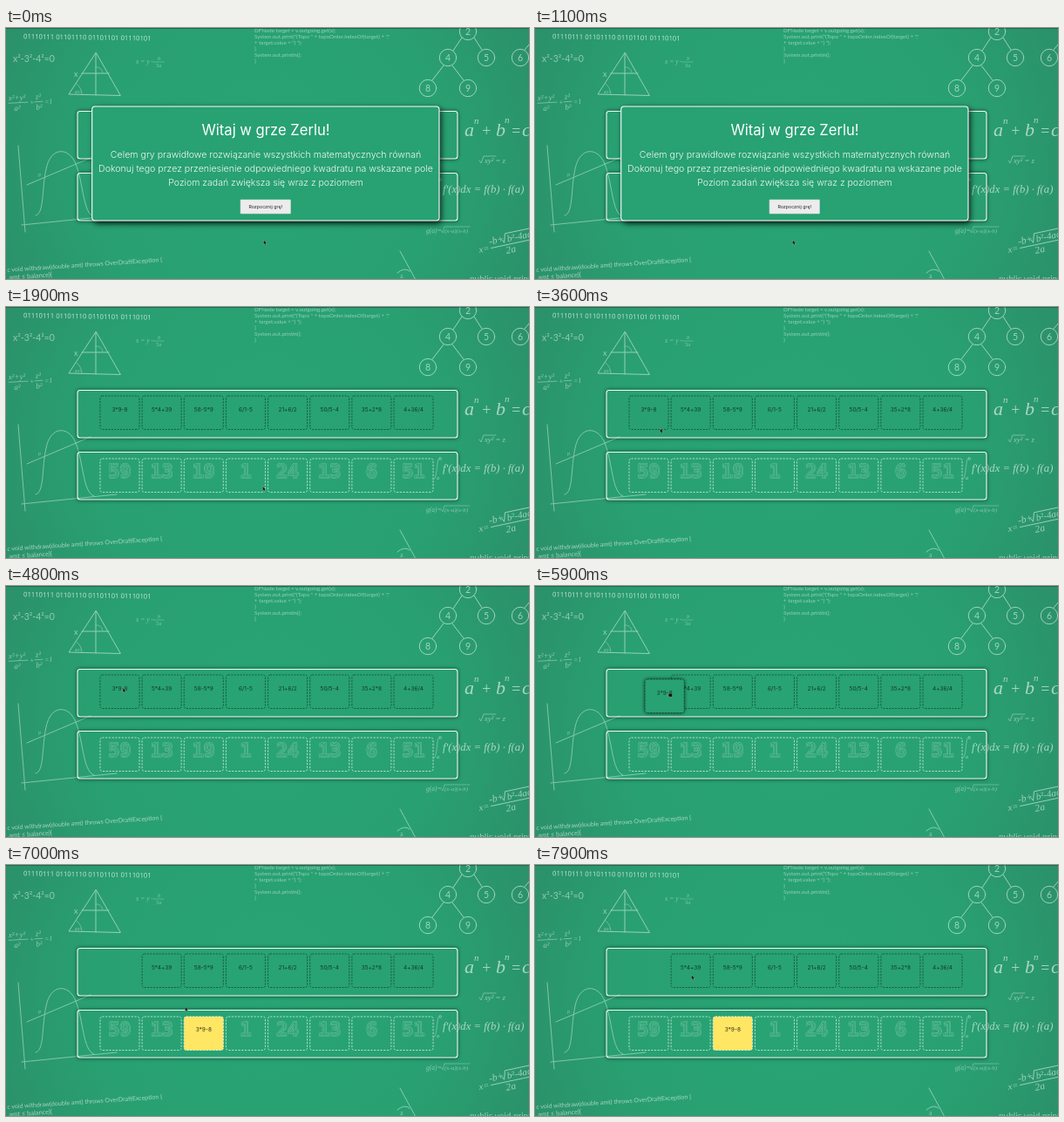
Write an HTML page that moves like this. It is 600 by 288 pixels and loops after 8000 ms.

```html
<!DOCTYPE html>
<html lang="pl">
<head>
<meta charset="utf-8">
<style>
html, body { margin: 0; width: 100%; height: 100%; overflow: hidden; background: #29a072; }
svg { display: block; width: 600px; height: 288px; }
text { white-space: pre; }
.chalk { fill: none; stroke: #fff; stroke-linecap: round; stroke-linejoin: round; }
.chalk text { fill: #fff; stroke: none; font-family: Lato, "Open Sans", sans-serif; }
.chalk .math text { font-family: "Liberation Serif", serif; font-style: italic; }
.ui text { font-family: Inter, "Open Sans", sans-serif; font-feature-settings: "calt" 0; text-anchor: middle; }
.ui .digits { font: bold 21.5px "DejaVu Sans Mono", monospace; fill: none; stroke-linejoin: round; }
</style>
</head>
<body>
<svg id="stage" viewBox="0 0 600 288">
  <defs>
    <radialGradient id="board" gradientUnits="userSpaceOnUse" cx="300" cy="150" r="340">
      <stop offset="0" stop-color="#28a474"/>
      <stop offset=".6" stop-color="#29a072"/>
      <stop offset="1" stop-color="#2b9069"/>
    </radialGradient>
    <filter id="soft" x="-30%" y="-30%" width="160%" height="160%"><feGaussianBlur stdDeviation="2"/></filter>
    <filter id="wide" x="-30%" y="-30%" width="160%" height="160%"><feGaussianBlur stdDeviation="3.5"/></filter>
    <clipPath id="outside">
      <path clip-rule="evenodd" d="M0 0H600V288H0ZM82 95.5H518V150H82ZM82 166.5H518V221H82Z"/>
    </clipPath>
  </defs>
  <rect width="600" height="288" fill="url(#board)"/>
  <rect width="600" height="1" fill="#1d6b4d"/>
  <g id="doodles" class="chalk"></g>
  <g id="panels" class="ui"></g>
  <g id="modal" class="ui"></g>
  <g id="cursor">
    <path id="arrow" d="M-1.5-2.8V2.4L-.3 1.4L.6 3.2L1.6 2.7L.8 1H2.3Z" fill="#111" stroke="#cfe8dc" stroke-width=".3"/>
    <path id="hand" d="M-2.3 0Q-2-1.6-.8-1.5Q-.4-3 .5-2Q1.8-2.4 2-.8Q3 0 2.2 2.2H-1.4Z" fill="#111" stroke="#cfe8dc" stroke-width=".3"/>
  </g>
</svg>
<script>
const LOOP = 8000, CLOSE = 1600, GRAB = 5500, DROP = 6700;
const GREEN = '#28a273';
const $ = id => document.getElementById(id);

const text = (x, y, str, size, attrs = '') =>
  `<text x="${x}" y="${y}" font-size="${size}" ${attrs}>${str}</text>`;
const path = (d, attrs = '') => `<path d="${d}" ${attrs}/>`;
const rect = (x, y, w, h, r, attrs) =>
  `<rect x="${x}" y="${y}" width="${w}" height="${h}" rx="${r}" ${attrs}/>`;
const group = (attrs, ...parts) => `<g ${attrs}>${parts.join('')}</g>`;

function doodles() {
  const nodes = [[530, 4, 2], [507, 34, 4], [551, 34, 5], [590, 34, 6], [484, 69, 8], [530, 69, 9]];
  const code = ['DFNode target = v.outgoing.get(x);',
    'System.out.print("(Topo " + topoOrder.indexOf(target) + ","',
    '+ target.value + ") ");', '}', 'System.out.println();', '}'];
  return [
    group('opacity=".75"', text(20, 12.3, '01110111 01101110 01101101 01110101', 7.7,
      'style="font-family:Open Sans,sans-serif" transform="rotate(.9 20 12)"')),
    group('opacity=".48"', text(8, 38.5, 'x²-3²-4²=0', 10.5)),
    group('opacity=".5" stroke-width="1"',
      path('M103 28.5L72 76L131 77.5ZM103 29V77M87 52H118'),
      path('M81 64Q87 69 87 76M103 45Q109 44 111 51', 'stroke-width=".6"'),
      text(78, 56, 'x', 9), text(79, 75, '45°', 4.5)),
    group('class="math" opacity=".4" stroke-width=".6"', text(149, 41, 'x = y -', 7.5),
      text(174, 37, 'b', 6.5), text(172, 45, '5a', 6.5), path('M169 39H181')),
    group('class="math" opacity=".5" stroke-width=".7" transform="rotate(-3 28 84)"',
      text(3, 82, 'x²+y²', 9), path('M3 85H25'), text(9, 94, 'a²', 9),
      text(27, 88, '+', 8), text(34, 82, 'z²', 9), path('M33 85H42'), text(34, 94, 'b²', 9),
      text(44, 88, '=1', 8)),
    group('opacity=".42" stroke-width="1"',
      path('M14 135L22 234M18 226L127 215'),
      path('M34 215C44 214 41 184 46 162C51 136 72 136 80 156C89 178 88 213 101 217'),
      path('M24 180L97 149'), text(37, 171, 'P', 5.5)),
    group('opacity=".58" transform="rotate(-3.8 0 280)"',
      text(1.5, 280, 'c void withdraw(double amt) throws OverDraftException {', 7.05),
      text(3, 289, 'amt ≤ balance){', 7.5)),
    group('opacity=".5"', ...code.map((line, i) => text(285, 4.5 + i * 7.15, line, 6.15))),
    group('opacity=".55" stroke-width="1"',
      path('M523 11L513 26M537 11L546 25M502 43L489 60M512 43L525 60M595 25L600 19'),
      ...nodes.map(([x, y, n]) => `<circle cx="${x}" cy="${y}" r="9.7"/>` +
        text(x, y + 3.8, n, 10.5, 'text-anchor="middle"'))),
    group('class="math" opacity=".6"', text(526, 124, 'a', 22), text(537, 110, 'n', 11),
      text(545, 124, '+', 18), text(562, 124, 'b', 22), text(572, 109, 'n', 11),
      text(579, 124, '=', 18), text(592, 124, 'c', 22)),
    group('class="math" opacity=".5" stroke-width=".7"', text(549, 155, 'xy² = z', 8.7),
      path('M543 152L545 155L548 147H562')),
    group('class="math" opacity=".6"',
      path('M498 173C493 171 496 198 490 198', 'stroke-width=".8" opacity=".7"'),
      text(497, 176, 'b', 6), text(494, 198, 'a', 6),
      text(501, 189, "f'(x)dx = f(b) · f(a)", 12.7)),
    group('class="math" opacity=".45" stroke-width=".6"', text(482, 235, 'g(a)=', 7.5),
      path('M499 232L501 235L503 228H532'), text(503, 235, '(x-a)(x-b)', 7)),
    group('class="math" opacity=".55" stroke-width=".9" transform="rotate(-12 545 256)"',
      text(543, 257.5, 'x=', 10.5), path('M557 255H606'), text(556, 251, '-b+', 11.5),
      path('M571 248L573 252L576 242H606'), text(577, 252, 'b²-4ac', 11), text(573, 265, '2a', 11.5)),
    group('opacity=".45" stroke-width="1"', path('M452 256L470 289M449 281Q457 274 463 279'),
      text(452, 287, 'a', 7)),
    group('opacity=".5"', text(532, 291, 'public void print', 10))
  ].join('');
}

const SIZE = [45, 38.5];
const SPACING = 48.15;
const slotX = i => 108 + i * SPACING;
const DARK_DASH = 'stroke="#154834" stroke-width=".8" stroke-dasharray="2 1.4"';
const LIGHT_DASH = 'stroke="#d3eee2" stroke-width=".8" stroke-dasharray="2.2 1.5"';

const panel = y =>
  group('clip-path="url(#outside)"',
    rect(81.5, y - .5, 437, 56, 3, 'fill="#04291a" opacity=".7" filter="url(#soft)"')) +
  rect(82, y, 436, 54.5, 3, 'fill="none" stroke="#f4fbf8" stroke-width="1.1"');

function tile(label, i) {
  const x = slotX(i), first = i === 0;
  return group(first ? 'id="piece"' : '',
    first ? rect(x, 102, ...SIZE, 3, 'id="lift" fill="#000" opacity=".8" filter="url(#soft)"') : '',
    rect(x, 102, ...SIZE, 2.5, `${first ? 'id="face"' : ''} fill="none" ${DARK_DASH}`),
    text(x + 22.5, 119.6, label, 6.5, 'fill="#123b2a"'));
}

function target(value, i) {
  const x = slotX(i), mid = x + 22.5;
  const digits = (color, width) => text(mid, 196.2, value, 21.5, `class="digits" stroke="${color}" stroke-width="${width}"`);
  return (i === 2 ? group('id="glow"',
      rect(x - 2, 172, 49, 42.5, 4, 'fill="#fff" opacity=".85" filter="url(#wide)"'),
      rect(x, 174, ...SIZE, 2.5, `fill="${GREEN}"`)) : '') +
    digits('#6fbf9f', 1.8) + digits(GREEN, .8) +
    rect(x, 174, ...SIZE, 2.5, `fill="none" ${LIGHT_DASH}`);
}

function panels() {
  const labels = ['3*9-8', '5*4+39', '58-5*9', '6/1-5', '21+6/2', '50/5-4', '35+2*8', '4+36/4'];
  const values = [59, 13, 19, 1, 24, 13, 6, 51];
  const x = slotX(2);
  return panel(95.5) + panel(166.5) + values.map(target).join('') +
    group('id="solved"', rect(x, 174, ...SIZE, 2.5, 'fill="#ffe663"'),
      rect(x, 174, ...SIZE, 2.5, `fill="none" ${LIGHT_DASH}`),
      text(x + 22.5, 190.6, '3*9-8', 6.5, 'fill="#33301c"')) +
    labels.map((label, i) => [label, i]).reverse().map(args => tile(...args)).join('');
}

function modal() {
  const light = 'fill="#eef8f3" font-weight="300"';
  return rect(101, 92, 398, 132, 4, 'fill="#000" opacity=".85" filter="url(#wide)"') +
    rect(98.7, 90, 398.3, 131, 3.5, 'fill="#28a173" stroke="#fff" stroke-width="1.1"') +
    text(298, 123, 'Witaj w grze Zerlu!', 16.6, 'fill="#fff"') +
    text(298, 149, 'Celem gry prawidłowe rozwiązanie wszystkich matematycznych równań', 10.6, light) +
    text(298, 165, 'Dokonuj tego przez przeniesienie odpowiedniego kwadratu na wskazane pole', 10.6, light) +
    text(298, 181, 'Poziom zadań zwiększa się wraz z poziomem', 10.5, light) +
    rect(269, 197, 57.5, 16, .5, 'fill="#ececec" stroke="#cfd6d3" stroke-width=".6"') +
    text(297.7, 206.8, 'Rozpocznij grę!', 5.3, 'fill="#222"');
}

// time, x, y
const route = [
  [0, 297, 246], [1150, 297, 246], [1500, 296, 208.5], [2200, 296, 208.5],
  [2800, 225, 178], [3350, 145, 142], [3700, 145, 142], [4300, 138, 123],
  [4900, 135, 119], [GRAB, 137, 120], [5900, 155, 125], [6400, 221, 180],
  [6600, 226, 186], [6800, 226, 186], [7200, 188, 145], [7600, 181, 129], [LOOP, 181, 129]
];

function pointer(t) {
  const i = Math.max(1, route.findIndex(p => p[0] >= t));
  const [t0, x0, y0] = route[i - 1], [t1, x1, y1] = route[i];
  const k = (t - t0) / (t1 - t0);
  return [x0 + (x1 - x0) * k, y0 + (y1 - y0) * k];
}

const show = (id, on) => $(id).setAttribute('display', on ? 'inline' : 'none');

function render(t) {
  const [x, y] = pointer(t);
  const dragging = t > GRAB && t < DROP;
  $('cursor').setAttribute('transform', `translate(${x} ${y})`);
  show('arrow', !dragging);
  show('hand', dragging);
  show('modal', t < CLOSE);
  show('piece', t < DROP);
  show('lift', dragging);
  show('solved', t >= DROP);
  show('glow', dragging && x > 204 && y > 166);
  $('face').setAttribute('fill', dragging ? GREEN : 'none');
  $('piece').setAttribute('transform', dragging ? `translate(${x - 137} ${y - 120})` : '');
}

$('doodles').innerHTML = doodles();
$('panels').innerHTML = panels();
$('modal').innerHTML = modal();

const start = performance.now();
function tick() {
  render((performance.now() - start) % LOOP);
  requestAnimationFrame(tick);
}
tick();
</script>
</body>
</html>
```
